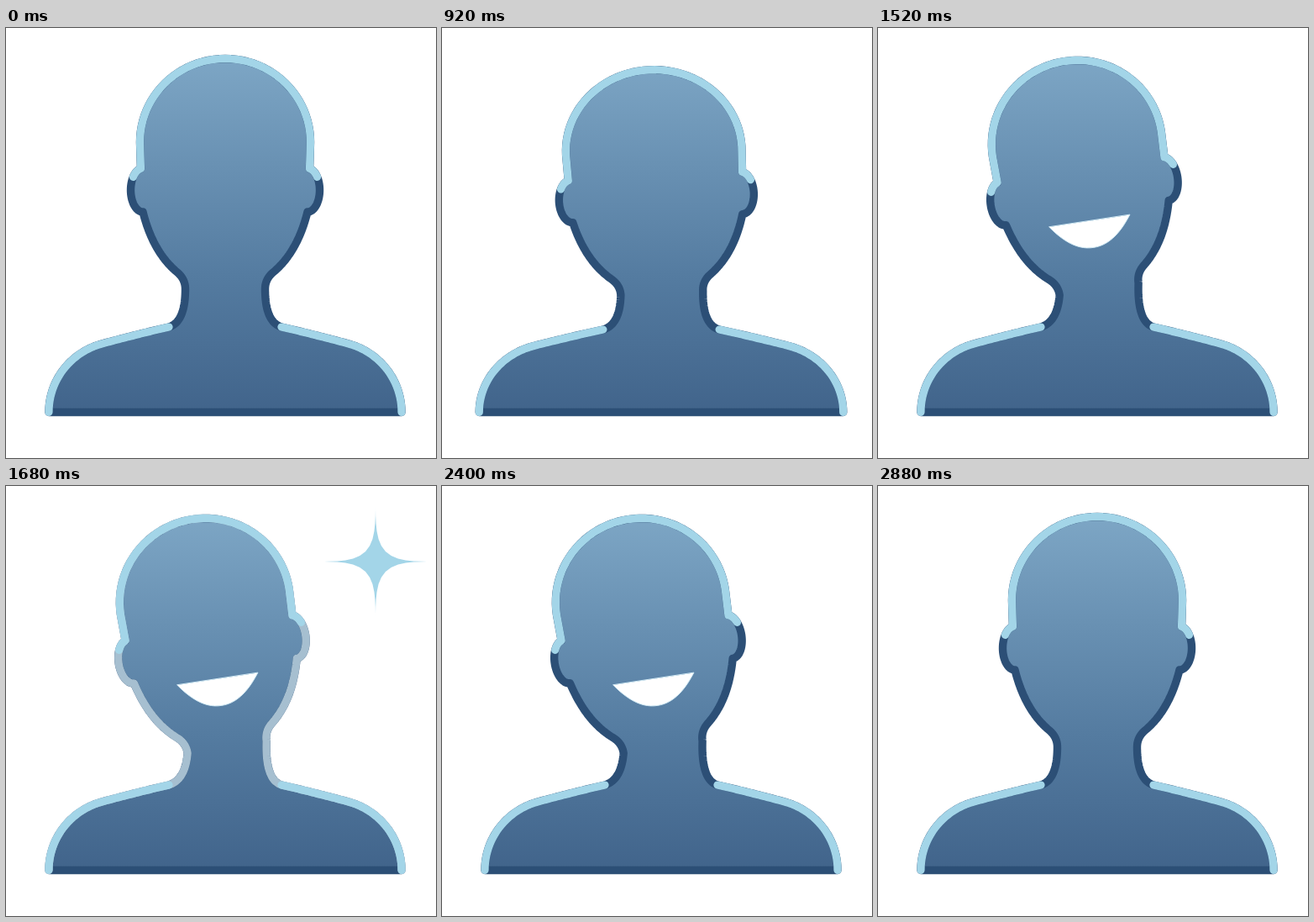
Recreate the animation shown at these times as an HTML page. Size 512 by 512 pixels, loop 3600 ms.

```html
<!DOCTYPE html>
<html lang="en">
<head>
<meta charset="utf-8">
<title>Smiling bust</title>
<style>
html, body { margin: 0; width: 100%; height: 100%; overflow: hidden; background: #fff; }
svg { display: block; width: 100vw; height: 100vh; }
path { stroke-linecap: round; stroke-linejoin: round; }
#body { fill: url(#skin); stroke: #2c4f76; stroke-width: 9.4; }
#flash { fill: none; stroke: #cfe4ee; stroke-width: 9.2; }
#light { fill: none; stroke: #a3d5e8; stroke-width: 9.2; }
#mouth { fill: #fff; stroke: #d3ebf5; }
#glint { fill: #a3d5e8; }
</style>
</head>
<body>
<svg viewBox="0 0 512 512">
  <linearGradient id="skin" gradientUnits="userSpaceOnUse" x1="0" y1="36" x2="0" y2="458">
    <stop offset="0" stop-color="#7da6c5"/>
    <stop offset=".62" stop-color="#547ba0"/>
    <stop offset="1" stop-color="#41648b"/>
  </linearGradient>
  <path id="body"/>
  <path id="flash"/>
  <path id="light"/>
  <path id="mouth"/>
  <path id="glint"/>
</svg>
<script>
const LOOP = 3600, STEP = 20;
const CX = 261, BASE = 457.5, HEAD_Y = 177;
const RAD = Math.PI / 180, TILT = -8.65 * RAD;

const part = id => document.getElementById(id);
const shape = (id, d) => part(id).setAttribute('d', d);
const ease = (t, from, to) => {
  const u = Math.min(1, Math.max(0, (t - from) / (to - from)));
  return u * u * (3 - 2 * u);
};
const bump = (t, from, peak, to) => ease(t, from, peak) - ease(t, peak, to);

const sample = (f, n = 24) => Array.from({ length: n + 1 }, (_, i) => f(i / n));
const arc = (cx, cy, rx, ry, from, to) => sample(u => {
  const a = (from + (to - from) * u) * RAD;
  return [cx + rx * Math.cos(a), cy - ry * Math.sin(a)];
});
const quad = (a, b, c) => sample(u =>
  [0, 1].map(i => (1 - u) ** 2 * a[i] + 2 * u * (1 - u) * b[i] + u * u * c[i]));
const line = pts => 'M' + pts.map(p => p.map(v => v.toFixed(2))).join('L');

function pose(t) {
  return {
    tilt: ease(t, 760, 1160) - ease(t, 2500, 2770),
    squash: bump(t, 760, 920, 1280) + bump(t, 2500, 2700, 2880),
    smile: ease(t, 960, 1220) - ease(t, 2400, 2637)
  };
}

// Progress of the running flash, or -1 between flashes.
function flashTime(t) {
  if (t >= 1320 && t < 1520) return (t - 1320) / 200;
  if (t >= 1560 && t < 1820) return (t - 1560) / 260;
  return -1;
}

// The body only squashes; the head also tilts with the upper neck.
function rig({ tilt, squash }) {
  const sx = 1 + .032 * squash, sy = 1 - .03 * squash;
  const cos = Math.cos(TILT * tilt), sin = Math.sin(TILT * tilt);
  const body = (x, y) => [CX + x * sx, BASE + (y - BASE) * sy];
  const head = (x, y) => {
    const dy = y - HEAD_Y;
    return body(x * cos - dy * sin - 18 * tilt, HEAD_Y + x * sin + dy * cos + 1.5 * tilt);
  };
  return { body, head };
}

// One half of the outline, k = -1 left, 1 right, from the base to the crown.
function side(k, { body, head }) {
  const onBody = pts => pts.map(([x, y]) => body(k * x, y));
  const onHead = pts => pts.map(([x, y]) => head(k * x, y));
  const collar = body(k * 67, 356), nape = head(k * 47.5, 311);
  const ear = (from, to) => onHead(arc(98, 193, 14.5, 26, from, to));
  const curve = arc(124, BASE, 86, 84.5, 0, 74);
  const shoulder = onBody([...curve, ...quad(curve.at(-1), [106, 365], [67, 356])]);
  const shadow = [
    ...quad(collar, body(k * 47.5, 350), nape),
    ...onHead(quad([47.5, 311], [47.5, 299], [57, 291])),
    ...onHead(quad([57, 291], [86, 267], [98, 219])),
    ...ear(-90, 37)
  ];
  const crown = [...ear(37, 80), ...onHead(arc(0, 136, 101.5, 99.5, 0, 90))];
  return { shoulder, crown, all: [...shoulder, ...shadow, ...crown] };
}

function drawMouth(head, smile) {
  const w = 48.5 * smile ** .25, d = 32 * smile, y = 58 - 6 * smile + HEAD_Y;
  const lip = sample(u => {
    const x = 2 * u - 1;
    return head(1 + w * x, y + d * (1 - Math.abs(x) ** 2.1));
  });
  shape('mouth', smile > .01 ? line(lip) + 'Z' : '');
}

function drawFlash(u) {
  part('flash').style.opacity = u < 0 ? 0 : u < .2 ? .75 + u * 1.25 : 1 - ease(u, .2, 1);
  const size = u < 0 ? 0 : 68 * Math.sin(Math.PI * u);
  const star = sample(v => {
    const a = v * 2 * Math.PI;
    return [440 + size * Math.cos(a) ** 5, 90 + size * Math.sin(a) ** 5];
  }, 64);
  shape('glint', size > 1 ? line(star) + 'Z' : '');
}

function draw(t) {
  const now = pose(t), joints = rig(now);
  const left = side(-1, joints), right = side(1, joints);
  const join = key => line([...left[key], ...right[key].reverse()]);
  const outline = join('all');
  shape('body', outline + 'Z');
  shape('flash', outline);
  shape('light', join('crown') + line(left.shoulder) + line(right.shoulder));
  drawMouth(joints.head, now.smile);
  drawFlash(flashTime(t));
}

const start = performance.now();
function tick() {
  const t = (performance.now() - start) % LOOP;
  draw(Math.floor(t / STEP) * STEP);
  requestAnimationFrame(tick);
}
tick();
</script>
</body>
</html>
```
